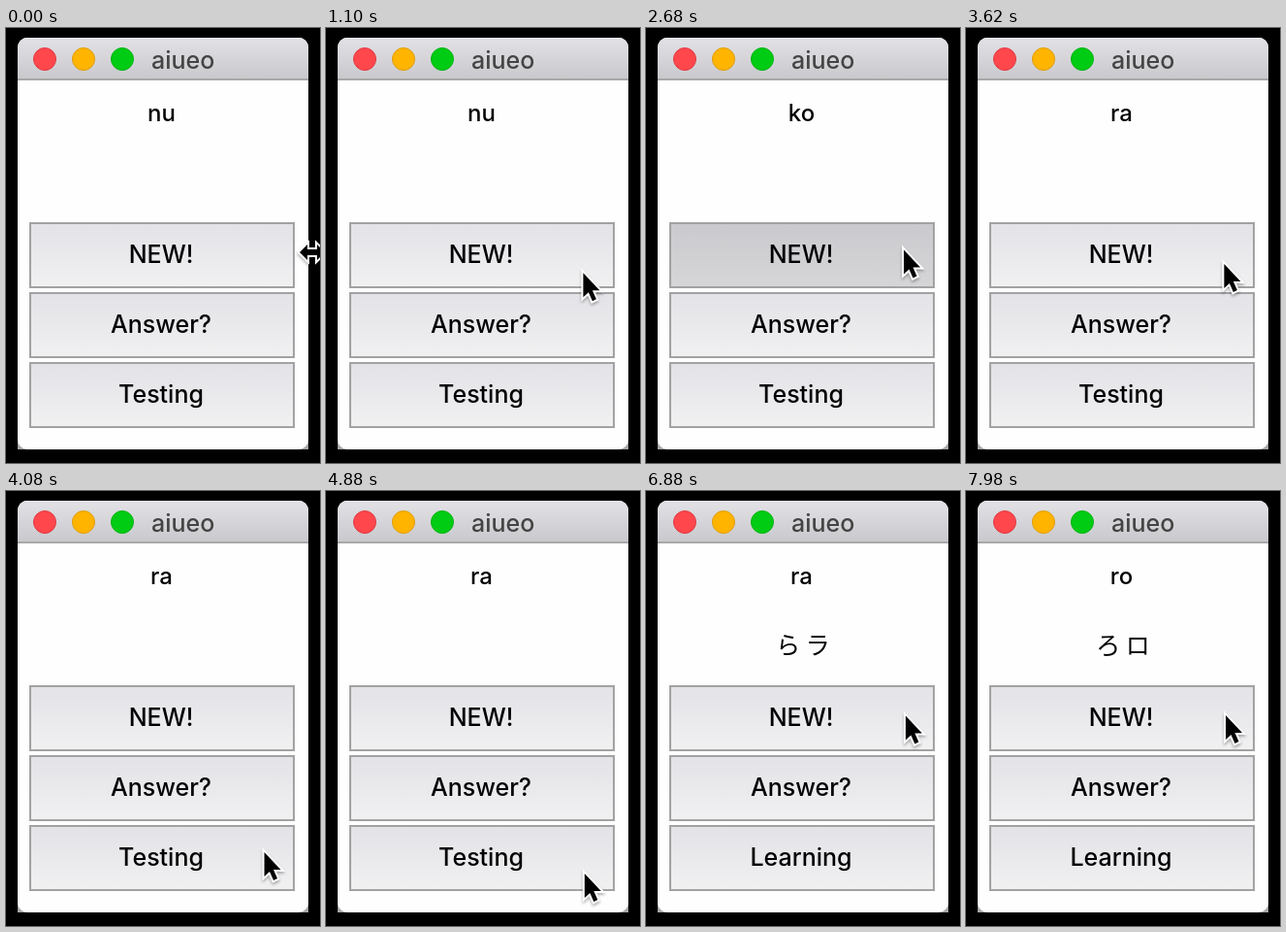
Animation, 324 px wide and 448 px high, one loop 8000 ms. Source, as an HTML page with a canvas:

```html
<!DOCTYPE html>
<html lang="ja">
<head>
<meta charset="utf-8">
<style>
html, body { margin: 0; width: 100%; height: 100%; overflow: hidden; background: #000; }
canvas { display: block; }
</style>
</head>
<body>
<canvas id="stage" width="324" height="448"></canvas>
<script>
const ctx = document.getElementById('stage').getContext('2d');
const LOOP = 8000;
const GLIDE = 500;
const HOLD = 150;
const RESIZE_END = 160;
const LEARNING_FROM = 5060;
const SANS = 'Inter, "Open Sans", sans-serif';
const KANA = '"Noto Sans CJK JP", "Noto Sans CJK", sans-serif';

// Vertical pointer moves: start time and the height reached.
const START_Y = 231;
const glides = [[400, 259], [950, 228], [2650, 282], [3080, 243], [3700, 394],
  [5200, 340], [5750, 354], [6400, 231]];

// A press acts when it is released.
const clicks = [
  { at: 1680, row: 0 }, { at: 2740, row: 0 },
  { at: LEARNING_FROM, row: 2 }, { at: 7580, row: 0 }
];
const words = [
  { from: 0, text: 'nu' }, { from: 1680, text: 'ko' },
  { from: 2740, text: 'ra', kana: 'ら ラ' }, { from: 7580, text: 'ro', kana: 'ろ ロ' }
];

const arrow = [[0, 0], [0, 25], [5.5, 20], [9.5, 29], [13.5, 27], [9.5, 18], [17, 18]];
const resizer = [[-13, 0], [-5, -8], [-5, -3], [5, -3], [5, -8]];
resizer.push(...resizer.map(([x, y]) => [-x, -y]));

function ease(k) {
  k = Math.min(1, Math.max(0, k));
  return k * k * (3 - 2 * k);
}

// The picture is refreshed three times every 140 ms, unevenly.
function refreshTime(t) {
  const phase = t % 140;
  return t - phase + (phase < 20 ? 0 : phase < 120 ? 20 : 120);
}

function gradient(y0, y1, from, to) {
  const g = ctx.createLinearGradient(0, y0, 0, y1);
  g.addColorStop(0, from);
  g.addColorStop(1, to);
  return g;
}

function label(text, x, y, { size = 25, color = '#000', font = SANS, weight = 500, align = 'center' } = {}) {
  ctx.font = `${weight} ${size}px ${font}`;
  ctx.textAlign = align;
  ctx.fillStyle = color;
  ctx.fillText(text, x, y);
}

function light(x, fill, edge) {
  ctx.beginPath();
  ctx.arc(x, 32, 11.5, 0, Math.PI * 2);
  ctx.fillStyle = fill;
  ctx.fill();
  ctx.strokeStyle = edge;
  ctx.lineWidth = 1;
  ctx.stroke();
}

function panel(radii, color) {
  ctx.beginPath();
  ctx.roundRect(12, 10, 300, 424, radii);
  ctx.fillStyle = color;
  ctx.fill();
}

function drawWindow() {
  ctx.fillStyle = '#000';
  ctx.fillRect(0, 0, 324, 448);
  panel([10, 10, 0, 0], '#a8a8a8');
  panel(10, '#fefefe');
  ctx.beginPath();
  ctx.roundRect(12, 10, 300, 44, [10, 10, 0, 0]);
  ctx.fillStyle = gradient(10, 54, '#e2e2e6', '#c8c8cc');
  ctx.fill();
  ctx.fillStyle = '#a8a8a8';
  ctx.fillRect(12, 52, 300, 2);
  light(40, '#ff474c', '#e03a40');
  light(80, '#ffb400', '#e09c00');
  light(120, '#00cc14', '#00b010');
  label('aiueo', 150, 42, { color: '#444', align: 'left' });
}

function drawButton(text, y, down) {
  ctx.fillStyle = '#a2a2a2';
  ctx.fillRect(24, y, 274, 68);
  ctx.fillStyle = down
    ? gradient(y, y + 68, '#cacace', '#d6d6d8')
    : gradient(y, y + 68, '#e2e2e7', '#f1f1f2');
  ctx.fillRect(26, y + 2, 270, 64);
  label(text, 160, y + 42);
}

function pointerAt(t) {
  let y = START_Y;
  for (const [start, to] of glides) y += (to - y) * ease((t - start) / GLIDE);
  const entry = 51 * (1 - ease(t / 800));
  const swing = 18 * Math.exp(-(((t - 6640) / 120) ** 2));
  return [265 + 3 * t / LOOP + entry + swing, y];
}

function drawPointer(shape, x, y) {
  ctx.save();
  ctx.translate(x, y);
  ctx.beginPath();
  shape.forEach(p => ctx.lineTo(...p));
  ctx.closePath();
  ctx.lineWidth = 4;
  ctx.strokeStyle = '#fff';
  ctx.shadowColor = 'rgba(0,0,0,.3)';
  ctx.shadowBlur = 3;
  ctx.shadowOffsetY = 2;
  ctx.stroke();
  ctx.shadowColor = 'transparent';
  ctx.fillStyle = '#000';
  ctx.fill();
  ctx.restore();
}

function draw(t) {
  const learning = t >= LEARNING_FROM;
  const word = words.filter(w => w.from <= t).pop();
  const click = clicks.find(c => t >= c.at - HOLD && t < c.at);

  drawWindow();
  label(word.text, 160.5, 96, { size: 24 });
  if (learning) label(word.kana, 162, 168, { font: KANA, weight: 400 });
  ['NEW!', 'Answer?', learning ? 'Learning' : 'Testing'].forEach((text, row) =>
    drawButton(text, 200 + 72 * row, click && click.row === row));
  drawPointer(t < RESIZE_END ? resizer : arrow, ...pointerAt(t));
}

const start = performance.now();
function tick() {
  draw(refreshTime((performance.now() - start) % LOOP));
  requestAnimationFrame(tick);
}
tick();
</script>
</body>
</html>
```
